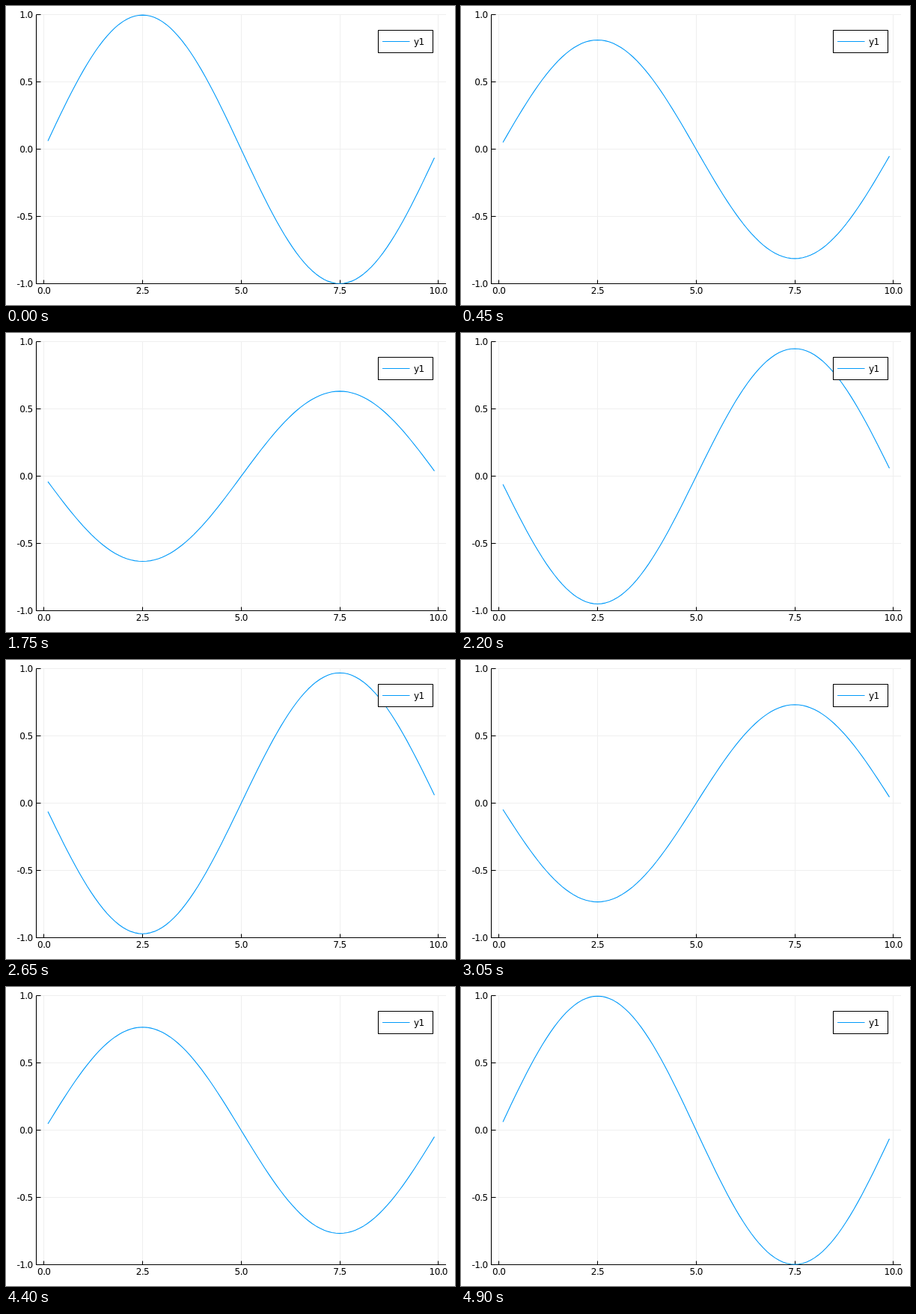
An HTML page with a canvas for the animation above (4950 ms loop, 600x400 px).

```html
<!DOCTYPE html>
<html lang="en">
<head>
<meta charset="utf-8">
<title>Standing wave</title>
<style>
  html, body { margin: 0; width: 100%; height: 100%; overflow: hidden; background: #fff; }
  canvas { display: block; }
</style>
</head>
<body>
<canvas id="plot" width="600" height="400"></canvas>
<script>
const ctx = document.getElementById("plot").getContext("2d");
const STEP_MS = 50, STEPS = 99;
const PHASE_PER_STEP = 2 * Math.PI / 100, START = 0.9;
const LEFT = 40.5, RIGHT = 588, TOP = 11.5, BOTTOM = 371.5;
const BLUE = "#009afa", BLACK = "#000", GRID = "#efefef";
const X_TICKS = [0, 2.5, 5, 7.5, 10];
const Y_TICKS = [-1, -0.5, 0, 0.5, 1];

const toX = x => 314.25 + (x - 5) * 52.7;
const toY = y => 191.7 - y * 179.9;
const crisp = v => Math.floor(v) + 0.5;

function line(x1, y1, x2, y2, color) {
  ctx.strokeStyle = color;
  ctx.beginPath();
  ctx.moveTo(x1, y1);
  ctx.lineTo(x2, y2);
  ctx.stroke();
}

function label(text, x, y, align) {
  ctx.textAlign = align;
  ctx.fillStyle = BLACK;
  ctx.fillText(text, x, y);
}

function drawAxes() {
  for (const x of X_TICKS) line(crisp(toX(x)), TOP, crisp(toX(x)), BOTTOM, GRID);
  for (const y of Y_TICKS) line(LEFT, crisp(toY(y)), RIGHT, crisp(toY(y)), GRID);

  line(LEFT, TOP, LEFT, BOTTOM + 0.5, BLACK);
  line(LEFT - 0.5, BOTTOM, RIGHT, BOTTOM, BLACK);
  for (const x of X_TICKS) {
    const px = crisp(toX(x));
    line(px, BOTTOM, px, BOTTOM - 5, BLACK);
    label(x.toFixed(1), toX(x), 385, "center");
  }
  for (const y of Y_TICKS) {
    const py = crisp(toY(y));
    line(LEFT, py, LEFT + 6, py, BLACK);
    label(y.toFixed(1), 35.5, toY(y) + 4.3, "right");
  }
}

function drawWave(amplitude) {
  ctx.strokeStyle = BLUE;
  ctx.beginPath();
  for (let i = 1; i <= 99; i++) {
    const x = i / 10;
    ctx.lineTo(toX(x), toY(amplitude * Math.sin(2 * Math.PI * x / 10)));
  }
  ctx.stroke();
}

function drawLegend() {
  ctx.fillStyle = "#fff";
  ctx.fillRect(497.5, 32.5, 73, 30);
  ctx.strokeStyle = BLACK;
  ctx.strokeRect(497.5, 32.5, 73, 30);
  line(503, 47.5, 539.5, 47.5, BLUE);
  label("y1", 545, 52, "left");
}

function draw(now) {
  const step = Math.floor(now / STEP_MS) % STEPS;
  ctx.fillStyle = "#fff";
  ctx.fillRect(0, 0, 600, 400);
  ctx.lineWidth = 1.1;
  ctx.lineJoin = "round";
  ctx.font = "12px 'DejaVu Sans', sans-serif";
  ctx.letterSpacing = "-0.6px";
  drawAxes();
  drawWave(Math.cos((step + START) * PHASE_PER_STEP));
  drawLegend();
}

const startTime = performance.now();
function tick() {
  draw(performance.now() - startTime);
  requestAnimationFrame(tick);
}
tick();
</script>
</body>
</html>
```
